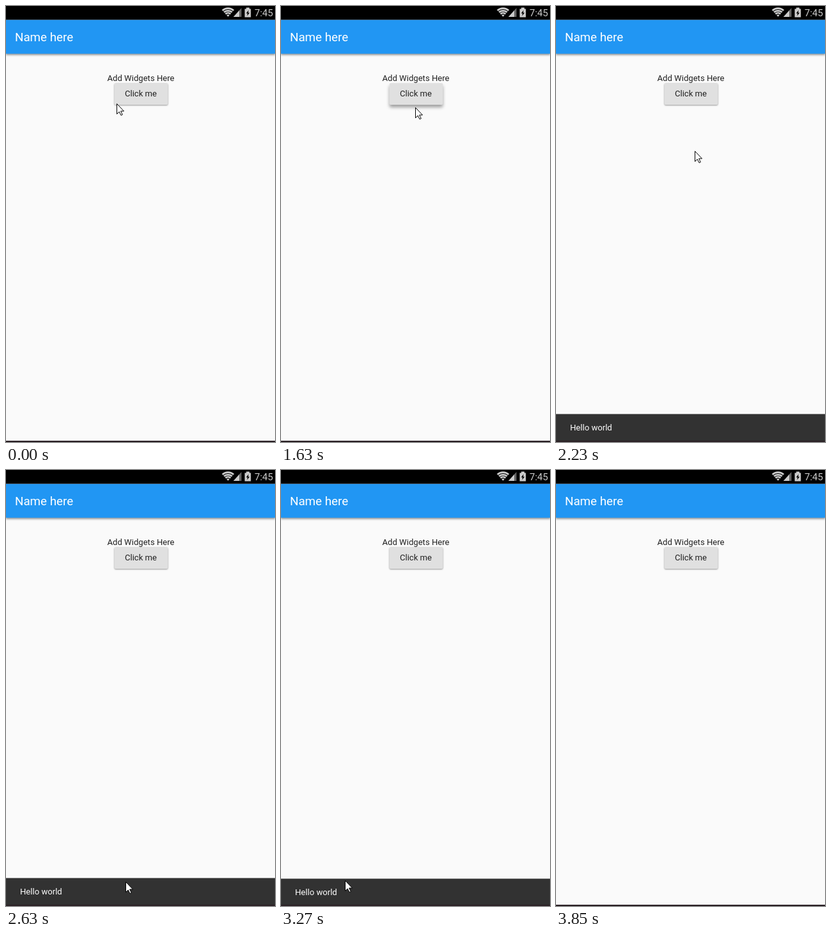
An HTML page for the animation above (5150 ms loop, 421 by 680 pixels).

```html
<!DOCTYPE html>
<html lang="en">
<head>
<meta charset="utf-8">
<title>Snackbar demo</title>
<style>
html, body { margin: 0; width: 100%; height: 100%; overflow: hidden; background: #fafafa; }
svg { display: block; font: 13.12px Roboto, sans-serif; }
#appbar { fill: #2196f3; filter: drop-shadow(0 2px 1.8px rgba(0,0,0,.4)); }
#button { fill: #e0e0e0; filter: drop-shadow(0 1px 1px rgba(0,0,0,.4)); }
#button.raised { filter: drop-shadow(0 4px 2.5px rgba(0,0,0,.36)); }
</style>
</head>
<body>
<svg width="421" height="680">
  <rect id="appbar" y="21.5" width="421" height="53"/>
  <rect width="421" height="21.5"/>
  <rect id="button" x="169.7" y="120.3" width="83.6" height="33.8" rx="2"/>

  <g fill="#ccc">
    <g transform="translate(347.5 16.5)">
      <path d="M-8.8-9.5A13 13 0 0 1 8.8-9.5M-6.3-6.7A9.2 9.2 0 0 1 6.3-6.7M-3.9-4.1A5.6 5.6 0 0 1 3.9-4.1"
            fill="none" stroke="#ccc" stroke-width="2.8"/>
      <path d="M0 .3L-2.2-2.1A3 3 0 0 1 2.2-2.1Z"/>
    </g>
    <path d="M356 17L368.5 3V17Z" fill="#666"/>
    <path d="M356 17L365 7V17Z"/>
    <path d="M376 2.5h5v2h2.2v13h-9.6v-13h2.4Z"/>
    <path d="M379.6 6.5L375.8 11.6H378L377.3 15.5L381.2 10.4H379Z" fill="#000"/>
    <text x="389" y="15.5" font-size="15">7:45</text>
  </g>

  <text x="14" y="55" font-size="18.8" fill="#fff">Name here</text>
  <g text-anchor="middle" fill="#212121">
    <text x="211" y="117">Add Widgets Here</text>
    <text x="211" y="141">Click me</text>
  </g>

  <g id="snackbar">
    <rect y="636.4" width="421" height="45" fill="#323232"/>
    <text x="22" y="662" fill="#fff">Hello world</text>
  </g>
  <rect y="678" width="421" height="2" fill="#2b2025"/>
  <path id="cursor" d="M.5.5V16.5L4.2 13L7 18.5L9.3 17.5L6.6 12H11.5Z" fill="#fff" stroke="#000"/>
</svg>
<script>
const LOOP = 5150, STEP = 200;
const CLICK = 1630, OPEN = 1830, CLOSING = 3270, CLOSED = 3450, POINTER_GONE = 3850;

// Turning points of the pointer tip: [step, x, y]
const approach = [[0, 173, 152], [2, 226, 130]];
const departure = [
  [0, 210, 158], [1, 210, 160], [4, 226, 309],
  [5, 187, 642], [6, 74, 660], [8, 100, 640]
];

const [button, snackbar, cursor] =
  ['button', 'snackbar', 'cursor'].map(id => document.getElementById(id));
const show = (el, visible) => el.setAttribute('visibility', visible ? 'visible' : 'hidden');
const move = (el, x, y) => el.setAttribute('transform', `translate(${x} ${y})`);

// Accelerates from each turning point to the next, sampled once per step.
function pointAt(path, time) {
  const step = Math.floor(time / STEP);
  const next = path.findIndex(([at]) => at > step);
  if (next < 0) return path.at(-1).slice(1);
  const [start, x0, y0] = path[next - 1];
  const [end, x1, y1] = path[next];
  const ease = ((step - start) / (end - start)) ** 2;
  return [x0 + (x1 - x0) * ease, y0 + (y1 - y0) * ease].map(Math.round);
}

function draw(now) {
  const t = now % LOOP;
  const clicked = t >= CLICK;
  move(cursor, ...pointAt(clicked ? departure : approach, clicked ? t - CLICK : t));
  show(cursor, t < POINTER_GONE);
  button.classList.toggle('raised', clicked && t < OPEN);
  show(snackbar, t >= OPEN && t < CLOSED);
  move(snackbar, 0, t >= CLOSING ? 1 : 0);
  requestAnimationFrame(draw);
}
draw(0);
</script>
</body>
</html>
```
